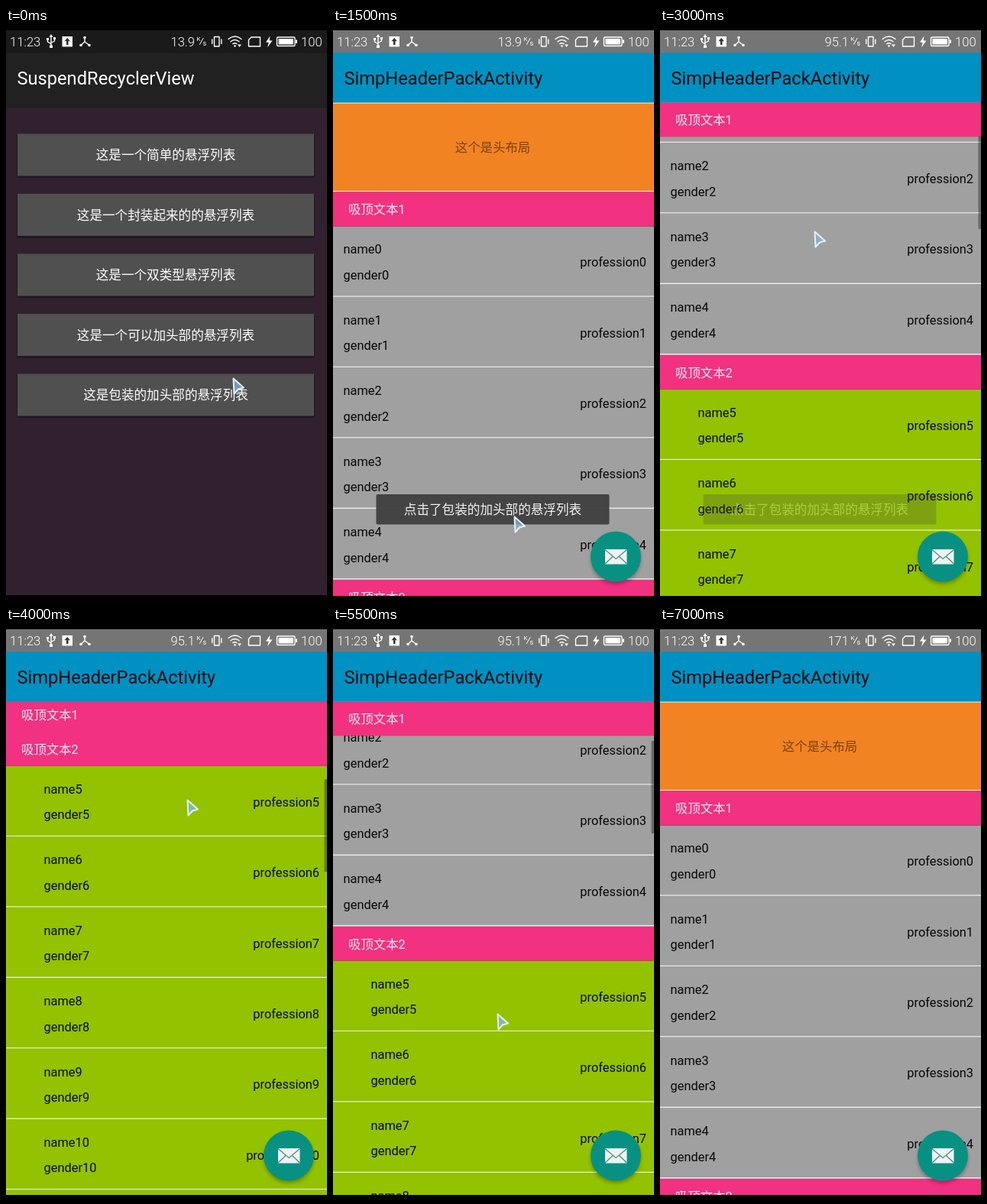
Animation, 420 px wide and 747 px high, one loop 7500 ms. Source, as an HTML page:

```html
<!DOCTYPE html>
<html lang="zh-CN">
<head>
<meta charset="utf-8">
<title>SuspendRecyclerView</title>
<style>
  html, body { margin: 0; width: 100%; height: 100%; overflow: hidden; background: #000; }
  svg { display: block; width: 420px; height: 747px; }
  text { font: 16.4px Roboto, "Noto Sans CJK SC", "Noto Sans CJK", sans-serif; white-space: pre; }
  .title { font-size: 23.7px; }
  .wide { font-size: 16.6px; }
  .light { font-size: 16.6px; font-weight: 300; }
  .line { fill: none; stroke: #fff; stroke-width: 1.4; stroke-linejoin: round; stroke-linecap: round; }
</style>
</head>
<body>
<svg viewBox="0 0 420 747" xmlns="http://www.w3.org/2000/svg">
  <defs>
    <clipPath id="listArea"><rect y="97" width="420" height="646"/></clipPath>
    <filter id="soft" x="-30%" y="-30%" width="160%" height="160%"><feGaussianBlur stdDeviation="2.5"/></filter>
  </defs>
  <rect width="420" height="747"/>

  <g id="home">
    <rect y="3" width="420" height="739" fill="#31212f"/>
    <rect y="3" width="420" height="102" fill="#212121"/>
    <rect y="3" width="420" height="30" fill="#1a1a1a"/>
    <text class="title" x="14.4" y="73.7" fill="#fff">SuspendRecyclerView</text>
  </g>

  <g id="detail">
    <rect y="3" width="420" height="30" fill="#757575"/>
    <rect y="32.5" width="420" height="65.5" fill="#0091c3"/>
    <text class="title" x="14.4" y="73.7" fill="#0b0b0b">SimpHeaderPackActivity</text>
    <g clip-path="url(#listArea)">
      <g id="list"></g>
      <g id="heads"></g>
      <rect id="bar" x="416.5" width="3.5" height="121" fill="#000"/>
      <rect y="97" width="420" height=".5" fill="#0091c3"/>
      <circle cx="370" cy="695" r="32.5" fill="#000" opacity=".3" filter="url(#soft)"/>
      <circle cx="370" cy="691.5" r="33" fill="#089183"/>
      <rect x="356" y="682" width="28.5" height="19.5" fill="#eef3f2"/>
      <path d="M356 682.5L370.2 694.5L384.5 682.5M356 701L366 691.5M384.5 701L374.5 691.5"
            fill="none" stroke="#4a8f88" stroke-width="1.3"/>
    </g>
  </g>

  <g id="status" fill="#fff">
    <text class="light" x="5" y="24">11:23</text>
    <path class="line" d="M59 10.5V24M54.5 14.5V18L59 21M63.5 13.5V17L59 19.5"/>
    <path d="M59 8L61.5 12H56.5ZM57 22.5H61V26H57ZM53 13H56V16H53ZM62 12H65V15H62Z"/>
    <rect x="73.5" y="11" width="13.5" height="13.5"/>
    <path d="M80.2 13L84 17.3H81.5V22H79V17.3H76.5Z" fill="#333"/>
    <path class="line" d="M103 12.5V18L98 22.5M103 18L109 22.5"/>
    <circle cx="103" cy="12.5" r="1.8"/><circle cx="98" cy="22.5" r="1.8"/><circle cx="109" cy="22.5" r="1.8"/>
    <text id="speed" class="light" x="247" y="24" text-anchor="end"></text>
    <text x="249.5" y="17" style="font-size:8px">K</text>
    <path class="line" d="M253.5 21.5L258 13.5" style="stroke-width:1"/>
    <text x="257.5" y="22.5" style="font-size:9px">s</text>
    <path class="line" d="M272.5 11.5H279V24H272.5ZM269.7 15V20.5M281.8 15V20.5"/>
    <path class="line" d="M291 14.5Q299.5 7.5 308 14.5M294 17.8Q299.5 13 305 17.8M296.8 20.8Q299.5 18.6 302 20.8"/>
    <circle cx="299.5" cy="23.5" r="1.3"/><path d="M303 21.5H308L305.5 25Z"/>
    <path class="line" d="M321 12H332.5V24H317.5V15.5Z"/>
    <path d="M345.5 10.5L340 18.7H343.8L342 25.5L348.5 16.5H344.6Z"/>
    <rect class="line" x="354.5" y="12" width="23.5" height="11.5" rx="1.5"/>
    <path d="M356.5 14H376V21.5H356.5ZM379 15.5H381V20H379Z"/>
    <text class="light" x="386" y="24">100</text>
  </g>

  <g id="toast">
    <rect x="56.5" y="610" width="305" height="39.5" rx="2" fill="#434343"/>
    <text class="wide" x="209" y="636" text-anchor="middle" fill="#f4f4f4">点击了包装的加头部的悬浮列表</text>
  </g>

  <path id="cursor" d="M1.5 1.5L15 13.5L8 15.5L2.5 21.5Z" stroke-linejoin="round"
        fill="#86b3d8" fill-opacity=".75" stroke="#e4f2f8" stroke-width="2"/>
</svg>
<script>
const STEP = 500, TOP = 97.5, PITCH = 92.4, HEAD = 44.5;
const $ = id => document.getElementById(id);

function add(parent, tag, attrs, text) {
  const el = document.createElementNS("http://www.w3.org/2000/svg", tag);
  for (const k in attrs) el.setAttribute(k, attrs[k]);
  if (text) el.textContent = text;
  return parent.appendChild(el);
}
const box = (parent, x, y, width, height, fill) => add(parent, "rect", { x, y, width, height, fill });
const rule = y => box($("list"), 0, y - 0.7, 420, 1.4, "rgba(255,255,255,.8)");

// Home buttons
["这是一个简单的悬浮列表", "这是一个封装起来的的悬浮列表", "这是一个双类型悬浮列表",
 "这是一个可以加头部的悬浮列表", "这是包装的加头部的悬浮列表"].forEach((label, i) => {
  const y = 138.5 + i * 78.5;
  box($("home"), 14, y + 1, 390, 56.5, "#1f171f");
  box($("home"), 15, y, 388, 55, "#505050");
  add($("home"), "text", { class: "wide", x: 209, y: y + 33.5, fill: "#fff", "text-anchor": "middle" }, label);
});

// List content, laid out at scroll zero
const sections = [
  { top: 214.5, first: 0, count: 5, x: 13.5, fill: "#a0a0a0" },
  { top: 722, first: 5, count: 9, x: 49.5, fill: "#93c200" }
];
box($("list"), 0, TOP, 420, 117, "#f28322");
rule(98);
rule(213.7);
add($("list"), "text", { x: 209, y: 162, fill: "#7b410c", "text-anchor": "middle" }, "这个是头布局");

sections.forEach((s, n) => {
  for (let i = 0; i < s.count; i++) {
    const y = s.top + HEAD + 0.4 + i * PITCH, id = s.first + i;
    box($("list"), 0, y, 420, PITCH + 0.5, s.fill);
    const put = (x, dy, text, anchor) =>
      add($("list"), "text", { x, y: y + dy, "text-anchor": anchor, fill: "#080808" }, text);
    put(s.x, 36, "name" + id, "start");
    put(s.x, 69.5, "gender" + id, "start");
    put(410, 52.8, "profession" + id, "end");
    rule(y + PITCH - 0.7);
  }
  s.head = add($("heads"), "g", {});
  box(s.head, 0, 0, 420, HEAD + 0.4, "#f23180");
  add(s.head, "text", { x: 20, y: 28.5, fill: "#ffeaf2" }, "吸顶文本" + (n + 1));
});

// cursor x, cursor y, scroll, toast opacity, scrollbar opacity
const poses = [
  [296, 457, 0, 0, 0],
  [232, 474, 0, 0, 0],
  [232, 474, 0, .18, 0],
  [236, 638, 0, .98, 0],
  [225, 560, 0, .98, 0],
  [212, 430, 130, .98, .35],
  [201, 265, 294, .25, .35],
  [222, 450, 360, 0, .35],
  [236, 225, 585, 0, .35],
  [210, 405, 690, 0, .35],
  [193, 463, 632, 0, .35],
  [214, 505, 330, 0, .35],
  [235, 577, 20, 0, .35],
  [236, 620, 0, 0, .3],
  [null, 0, 0, 0, 0]
];

const show = (id, on) => $(id).setAttribute("display", on ? "inline" : "none");
const move = (el, x, y) => el.setAttribute("transform", `translate(${x} ${y})`);

function draw(i) {
  const [x, y, scroll, toast, bar] = poses[i];
  show("home", i < 3);
  show("detail", i >= 3);
  show("cursor", x !== null);
  move($("cursor"), x || 0, y);
  move($("list"), 0, -scroll);
  const second = Math.max(TOP, sections[1].top - scroll);
  const first = Math.min(second - HEAD, Math.max(TOP, sections[0].top - scroll));
  move(sections[0].head, 0, first);
  move(sections[1].head, 0, second);
  $("bar").setAttribute("y", 84 + scroll * 0.197);
  $("bar").setAttribute("opacity", bar);
  $("toast").setAttribute("opacity", toast);
  $("speed").textContent = i < 6 ? "13.9" : i < 12 ? "95.1" : "171";
}

const start = performance.now();
let last = -1;
function tick() {
  const t = Math.max(0, performance.now() - start);
  const i = Math.floor(t / STEP) % poses.length;
  if (i !== last) draw(last = i);
  requestAnimationFrame(tick);
}
tick();
</script>
</body>
</html>
```
